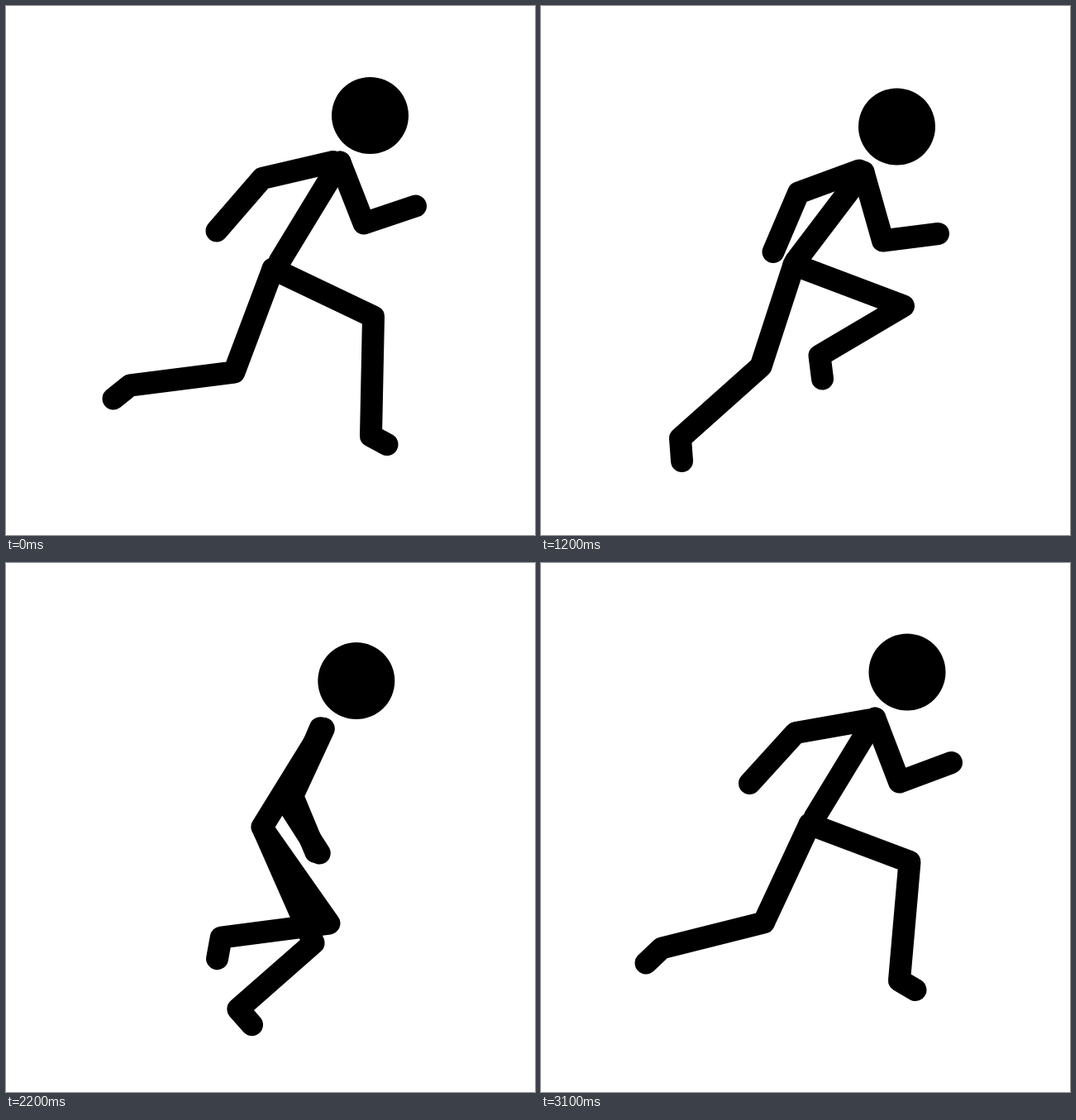
Recreate the animation shown at these times as an HTML page with a canvas. Size 640x640 px, loop 3200 ms.

```html
<!DOCTYPE html>
<html lang="en">
<head>
<meta charset="utf-8">
<title>Running stick figure</title>
<style>
  html, body { margin: 0; width: 100%; height: 100%; overflow: hidden; background: #fff; }
  canvas { display: block; width: 100vw; height: 100vh; }
</style>
</head>
<body>
<canvas id="stage" width="640" height="640"></canvas>
<script>
const ctx = document.getElementById('stage').getContext('2d');
const STEP = 100, CYCLE = 32, LIMB = 27, HEAD = 46.5;

// Key poses of the run cycle; times are counted in steps.
const times = [0, 4, 8, 12, 15, 19, 24, 31];

// head, neck, nape, waist, hip
const trunk = [
  [440.5, 132.5, 404, 189, 396, 188.5, 331, 309, 323, 318],
  [426, 146, 391.5, 203.5, 379, 206.5, 321, 320, 318, 326.5],
  [419.5, 153, 385.5, 212, 376, 217, 306, 324, 305.5, 334],
  [430.5, 146, 390, 201, 385, 199, 308, 309, 306, 313],
  [437.5, 136, 400, 193, 391, 192, 319, 308, 316, 314],
  [432.5, 137.5, 393, 196, 384, 195, 314, 311, 317, 312],
  [421.5, 145.5, 381, 202, 381, 202, 308, 321, 309, 328],
  [443, 132, 404, 188, 396, 190, 331, 308, 325, 316],
];

// elbow and hand of each arm
const arms = [
  [310, 208.5, 255, 272, 433, 263, 495.5, 242],
  [318, 235, 285.5, 296.5, 410.5, 276.5, 470.5, 286.5],
  [359.5, 291.5, 421.5, 335.5, 326, 274, 298.5, 313],
  [413.5, 284, 480.5, 275.5, 311.5, 226, 281, 297.5],
  [431, 267, 499, 244, 303, 212, 255, 275],
  [410, 276.5, 477.5, 281.5, 299.5, 235, 279.5, 310],
  [312, 261, 294, 336, 385, 301.5, 446, 330],
  [308, 205.5, 252.5, 266.5, 433.5, 265, 496.5, 241.5],
];

// knee, ankle and toe of each leg
const legs = [
  [444.5, 376, 441.5, 520, 461, 530.5, 276, 443, 150, 459, 130, 475],
  [427, 415, 393, 530, 411, 546, 302, 456.5, 182, 434, 167.5, 452],
  [363.5, 438, 274.5, 523, 291, 562, 358, 431, 256, 424.5, 234.5, 451],
  [266, 436, 168.5, 523, 170.5, 550.5, 438.5, 363, 337, 423, 340.5, 451],
  [275, 440, 165, 462, 147, 478, 445, 372, 438, 510, 458, 521],
  [305.5, 445, 188, 443, 169.5, 455, 437, 409, 390.5, 521, 405, 537.5],
  [428, 399.5, 298.5, 438.5, 306, 466, 320, 468, 213, 532, 229, 554],
  [446, 361.5, 433.5, 505, 453, 516.5, 269.5, 435, 146, 466, 127, 484],
];

// The push-off pose returns in the second stride with the sides exchanged.
const swapSides = row => [...row.slice(row.length / 2), ...row.slice(0, row.length / 2)];
times.splice(7, 0, 27);
trunk.splice(7, 0, trunk[3]);
arms.splice(7, 0, swapSides(arms[3]));
legs.splice(7, 0, swapSides(legs[3]));

const count = times.length;
const timeAt = i => times[(i + count) % count] + CYCLE * Math.floor(i / count);

// Smooth periodic curve through one value per key pose.
function curve(values) {
  const value = i => values[(i + count) % count];
  const gap = i => timeAt(i + 1) - timeAt(i);
  const slope = i => (value(i + 1) - value(i)) / gap(i);
  const tangent = i =>
    (slope(i - 1) * gap(i) + slope(i) * gap(i - 1)) / (gap(i - 1) + gap(i));
  return t => {
    let i = count - 1;
    while (times[i] > t) i--;
    const h = gap(i), u = (t - times[i]) / h, v = 1 - u;
    return value(i) * v * v * (1 + 2 * u) + value(i + 1) * u * u * (3 - 2 * u)
      + h * u * v * (tangent(i) * v - tangent(i + 1) * u);
  };
}

const pointsOf = (rows, index) => rows.map(row => row.slice(index * 2, index * 2 + 2));

function joint(points) {
  const x = curve(points.map(p => p[0])), y = curve(points.map(p => p[1]));
  return t => [x(t), y(t)];
}

// A bone turns about its upper end, so it is interpolated as angle and length.
function bone(from, to) {
  let last;
  const angles = from.map(([x, y], i) => {
    const a = Math.atan2(to[i][1] - y, to[i][0] - x);
    last = last === undefined ? a : a - 2 * Math.PI * Math.round((a - last) / (2 * Math.PI));
    return last;
  });
  const lengths = from.map(([x, y], i) => Math.hypot(to[i][0] - x, to[i][1] - y));
  const angle = curve(angles), length = curve(lengths);
  return ([x, y], t) => [x + length(t) * Math.cos(angle(t)), y + length(t) * Math.sin(angle(t))];
}

function limb(root, ...ends) {
  const start = joint(root);
  const bones = ends.map((end, i) => bone(i ? ends[i - 1] : root, end));
  return t => bones.reduce((path, next) => [...path, next(path[path.length - 1], t)], [start(t)]);
}

const [heads, necks, napes, waists, hips] = [0, 1, 2, 3, 4].map(i => pointsOf(trunk, i));

function arm(side) {
  const elbows = pointsOf(arms, side * 2), others = pointsOf(arms, 2 - side * 2);
  const shoulders = elbows.map((e, i) => e[0] < others[i][0] ? napes[i] : necks[i]);
  return limb(shoulders, elbows, pointsOf(arms, side * 2 + 1));
}

const leg = side => limb(hips, ...[0, 1, 2].map(i => pointsOf(legs, side * 3 + i)));

const head = joint(heads);
const limbs = [limb(necks, waists), arm(0), arm(1), leg(0), leg(1)];

function draw(now) {
  const t = Math.floor(now / STEP) % CYCLE;
  ctx.fillStyle = '#fff';
  ctx.fillRect(0, 0, 640, 640);
  ctx.fillStyle = ctx.strokeStyle = '#000';
  ctx.lineWidth = LIMB;
  ctx.lineCap = ctx.lineJoin = 'round';
  for (const path of limbs) {
    ctx.beginPath();
    path(t).forEach(p => ctx.lineTo(...p));
    ctx.stroke();
  }
  ctx.beginPath();
  ctx.arc(...head(t), HEAD, 0, 2 * Math.PI);
  ctx.fill();
}

const start = performance.now();
function tick() {
  draw(performance.now() - start);
  requestAnimationFrame(tick);
}
tick();
</script>
</body>
</html>
```
